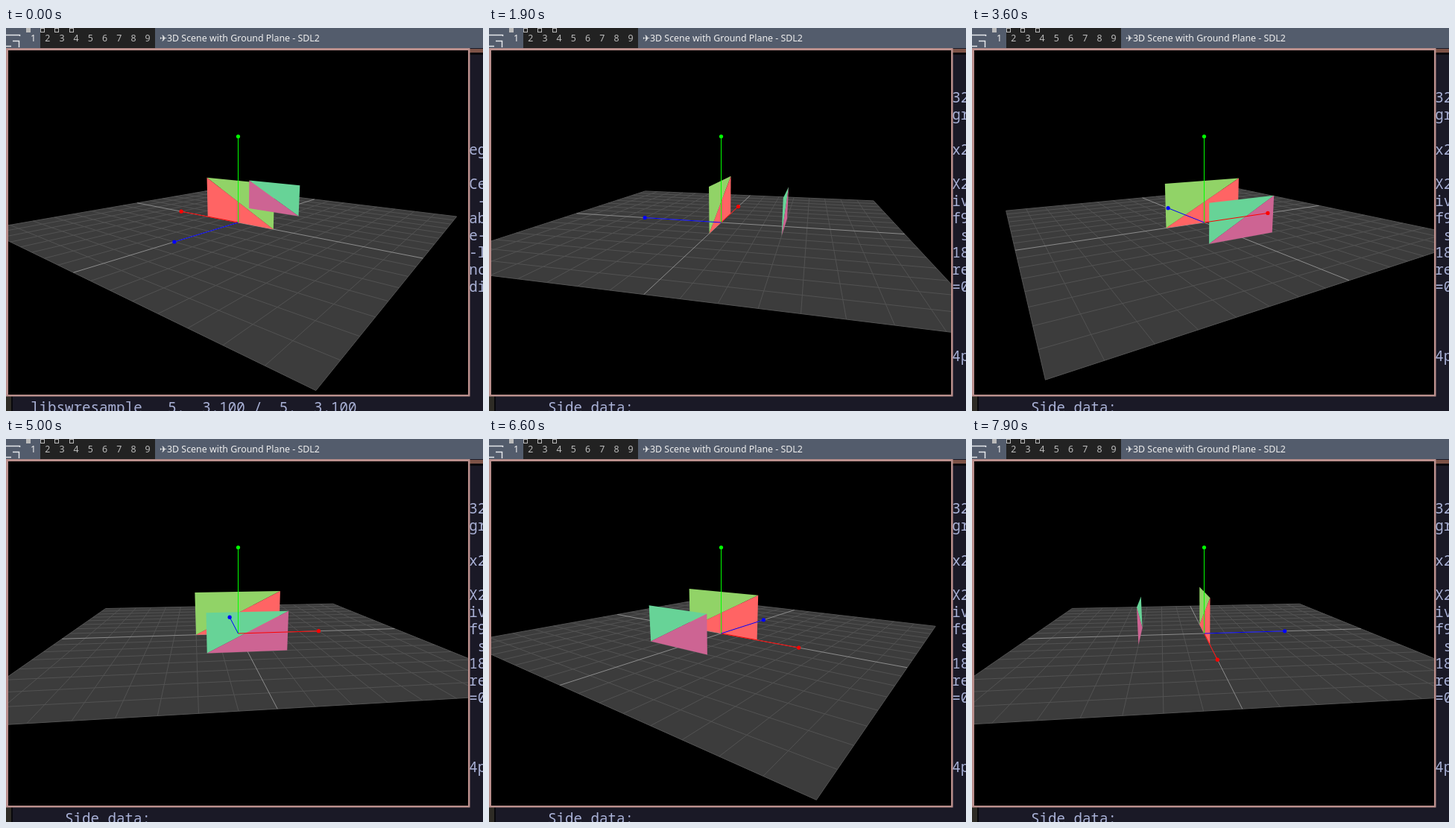
Animation, 640 px wide and 514 px high, one loop 8000 ms. Source, as an HTML page with a canvas:

```html
<!DOCTYPE html>
<html lang="en">
<head>
<meta charset="utf-8">
<title>3D Scene with Ground Plane</title>
<style>
html, body { margin: 0; width: 100%; height: 100%; overflow: hidden; background: #000; }
canvas { display: block; }
</style>
</head>
<body>
<canvas id="stage" width="640" height="514"></canvas>
<script>
const ctx = document.getElementById('stage').getContext('2d');
const LOOP = 8000;
const CX = 311.5, CY = 261, FOCAL = 462;
const EYE_Y = 4, EYE_Z = 16, DIST = Math.hypot(EYE_Y, EYE_Z);
const SIN = EYE_Y / DIST, COS = EYE_Z / DIST;
const HALF = 8, AXIS = 4;

// The scene turns in jumps: times in ms and the heading held from then on
const JUMPS = [0, 100, 1000, 1700, 2600, 3400, 4200, 5100, 5900, 6700, 7300];
const HEADINGS = [-141.4, -117.55, -96.5, -75.4, -53, -31.25, -7.2, 15, 37.1, 59.9, 83];

// Terminal text: [line above the bottom one, two visible characters]
const TEXT_START = [[15, 'eg'], [13, 'Ce'], [12, ' -'], [11, 'ab'], [10, 'e-'], [9, '-l'], [8, 'nc'], [7, 'di']];
const TEXT_LATER = [[18, '32'], [17, 'gr'], [15, 'x2'], [13, 'X2'], [12, 'iv'], [11, 'f9'], [10, ' s'],
  [9, '18'], [8, 're'], [7, '=0'], [3, '4p']];

let turnCos = 1, turnSin = 0;

function project(x, y, z) {
  const side = x * turnCos + z * turnSin;
  const near = x * turnSin - z * turnCos;
  const scale = FOCAL / (DIST - near * COS - y * SIN);
  return [CX + side * scale, CY - (y * COS - near * SIN) * scale];
}

function rect(color, x, y, w, h) {
  ctx.fillStyle = color;
  ctx.fillRect(x, y, w, h);
}

function text(str, x, y, color, font) {
  ctx.fillStyle = color;
  ctx.font = font;
  ctx.fillText(str, x, y);
}

function trace(points) {
  ctx.beginPath();
  points.forEach(p => ctx.lineTo(...project(...p)));
}

function polygon(color, ...points) {
  trace(points);
  ctx.fillStyle = color;
  ctx.fill();
}

function line(color, ...points) {
  trace(points);
  ctx.strokeStyle = color;
  ctx.stroke();
}

function axis(color, ...tip) {
  line(color, [0, 0, 0], tip);
  ctx.beginPath();
  ctx.arc(...project(...tip), 2.6, 0, 7);
  ctx.fillStyle = color;
  ctx.fill();
}

function panel(size, z, upper, lower) {
  const a = [-size, 0, z], b = [size, size, z];
  polygon(upper, a, [-size, size, z], b);
  polygon(lower, a, [size, 0, z], b);
}

function ground() {
  polygon('#3c3c3c', [-HALF, 0, -HALF], [HALF, 0, -HALF], [HALF, 0, HALF], [-HALF, 0, HALF]);
  for (let i = -HALF; i <= HALF; i++) {
    if (!i) continue;
    line('#525252', [i, 0, -HALF], [i, 0, HALF]);
    line('#525252', [-HALF, 0, i], [HALF, 0, i]);
  }
  line('#8c8c8c', [0, 0, -HALF], [0, 0, HALF]);
  line('#8c8c8c', [-HALF, 0, 0], [HALF, 0, 0]);
}

function scene(heading) {
  turnCos = Math.cos(heading * Math.PI / 180);
  turnSin = Math.sin(heading * Math.PI / 180);
  ctx.save();
  ctx.beginPath();
  ctx.rect(3, 30, 617, 462);
  ctx.clip();
  ctx.lineWidth = 1;
  ground();
  panel(2, 0, '#91d367', '#ff6464');
  panel(1.6, -3, '#67d397', '#cd6493');
  axis('#f00', AXIS, 0, 0);
  axis('#0f0', 0, AXIS, 0);
  axis('#00f', 0, 0, AXIS);
  ctx.restore();
}

function topBar() {
  const font = '12.4px "Noto Sans", "Open Sans", sans-serif';
  rect('#535c6c', 0, 0, 640, 27);
  rect('#222222', 46, 0, 154, 27);
  ctx.strokeStyle = '#e4e6ea';
  ctx.lineWidth = 1.5;
  ctx.stroke(new Path2D('M0 9.5H18.5V11M9 17.5H17.5V26M0 24.5H7'));
  rect('#bbbbbb', 27, 0, 6, 6);
  ctx.lineWidth = 1;
  ctx.strokeStyle = '#bbbbbb';
  for (const x of [46, 65, 85]) ctx.strokeRect(x + .5, .5, 5, 5);
  for (let i = 0; i < 9; i++) text(i + 1, 33 + i * 19.2, 18, i ? '#bbbbbb' : '#eeeeee', font);
  text('✈', 206, 18, '#eeeeee', '12px "DejaVu Sans", sans-serif');
  text('3D Scene with Ground Plane - SDL2', 216, 18, '#eeeeee', font);
}

function terminal(rows, bottom, x) {
  const font = '19.2px "Noto Sans Mono", "DejaVu Sans Mono", monospace', color = '#a9b1d6';
  rect('#1a1926', 0, 27, 640, 487);
  rect('#7d5347', 622, 28, 18, 5);
  rect('#08080c', 622, 33, 18, 3);
  rect('#2e2b25', 0, 494, 7, 20);
  rect('#08080c', 7, 494, 2, 20);
  for (const [up, str] of rows) text(str, 621.3, 516 - up * 23.1, color, font);
  text(bottom, x, 516, color, font);
  rect('#ba8f8c', 0, 27, 622.5, 467.5);
  rect('#000', 3, 30, 617, 462);
}

function frame(now) {
  const t = now % LOOP;
  const step = JUMPS.filter(start => start <= t).length - 1;
  if (step < 1) terminal(TEXT_START, 'libswresample   5.  3.100 /  5.  3.100', 33);
  else terminal(TEXT_LATER, 'Side data:', 79);
  topBar();
  scene(HEADINGS[step]);
  requestAnimationFrame(frame);
}

frame(0);
</script>
</body>
</html>
```
